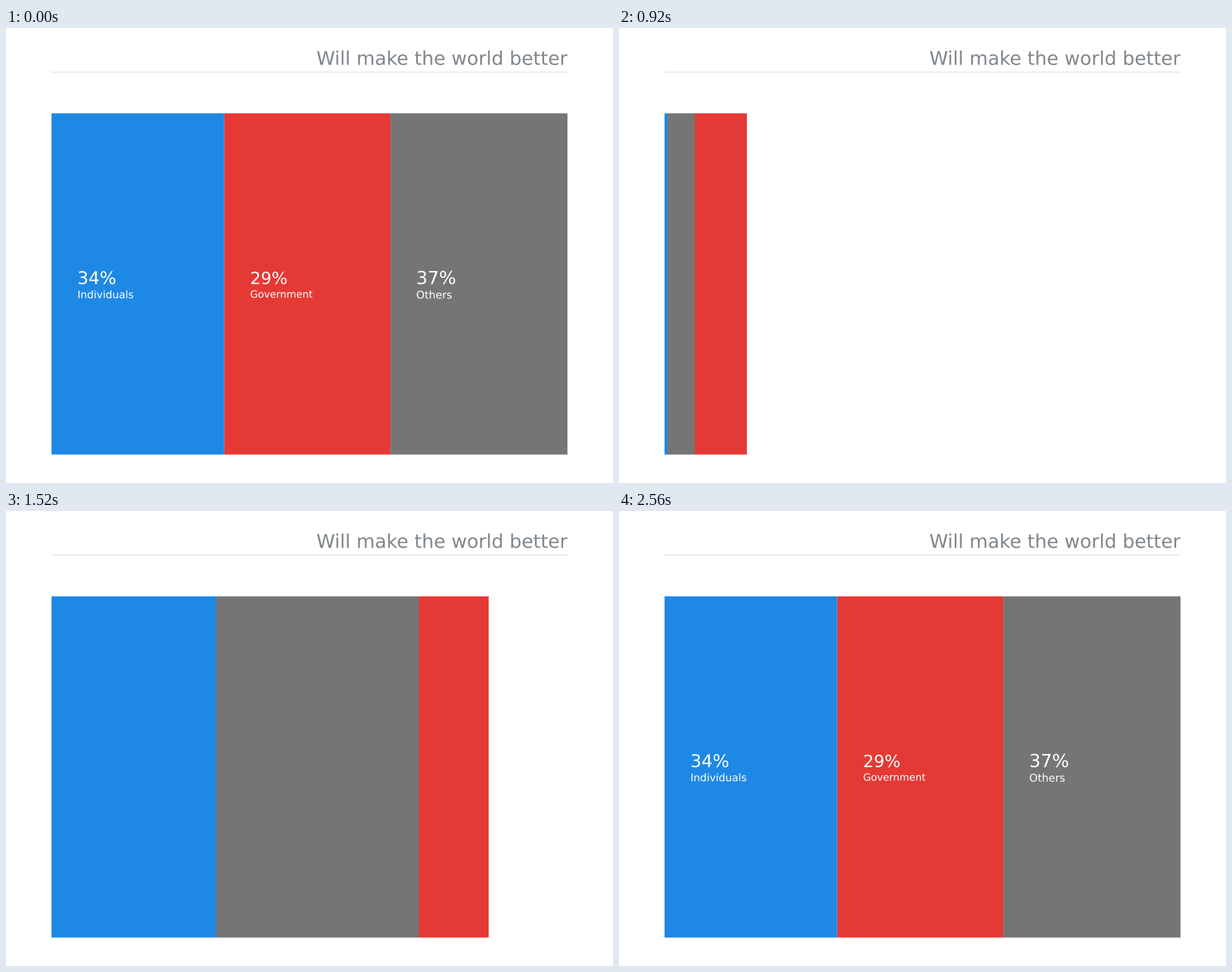
Write a matplotlib script that moves like this. It is 864 by 648 pixels and loops after 6600 ms.

```python
import matplotlib.pyplot as plt
import numpy as np
from matplotlib.animation import FuncAnimation
from matplotlib.patches import PathPatch, Rectangle
from matplotlib.textpath import TextPath
from matplotlib.transforms import Affine2D

W, H = 864, 648
STEP, LOOP = 20, 6600
LEFT, RIGHT, TOP, BOTTOM = 64.8, 799.2, 121.5, 607.5
SPLIT_1, SPLIT_2 = 310.7, 547.1
BLUE, RED, GRAY, INK = "#1e88e5", "#e53935", "#757575", "#80868b"

fig = plt.figure(figsize=(W / 100, H / 100), dpi=100, facecolor="white")
ax = fig.add_axes([0, 0, 1, 1])
ax.set_xlim(0, W)
ax.set_ylim(H, 0)
ax.axis("off")


def box(color, x, y, width, height):
    return ax.add_patch(Rectangle((x, y), width, height, fc=color, lw=0,
                                  snap=False))


def write(text, x, y, size, color, right=False):
    """Text with its baseline at y, starting (or ending) at x."""
    path = TextPath((0, 0), text, size=size, prop={"family": "DejaVu Sans"})
    if right:
        x -= path.get_extents().x1
    place = Affine2D().scale(1, -1).translate(x, y) + ax.transData
    patch = PathPatch(path, fc=color, lw=0, transform=place, zorder=9)
    return ax.add_patch(patch)


def sweep(t, start, end, stop):
    """Front moving from LEFT to stop with a cubic ease in and out."""
    p = np.clip((t - start) / (end - start), 0, 1)
    if p == 1:
        return stop
    eased = 4 * p ** 3 if p < 0.5 else 1 - 4 * (1 - p) ** 3
    x = LEFT + (stop - LEFT) * eased
    return max(LEFT, round(x)) if x > LEFT + 1 else x


write("Will make the world better", RIGHT, 52.5, 26.93, INK, right=True)
box("#dadce0", LEFT, 62.4, RIGHT - LEFT, 1)

# Strips side by side, left to right.
strips = [box(c, LEFT, TOP, 0, BOTTOM - TOP) for c in (BLUE, RED, GRAY, RED)]

# Label sizes follow the width of their column.
labels = []
middle = (TOP + BOTTOM) / 2 + 0.2
for x0, x1, share, name in ((LEFT, SPLIT_1, "34%", "Individuals"),
                            (SPLIT_1, SPLIT_2, "29%", "Government"),
                            (SPLIT_2, RIGHT, "37%", "Others")):
    x, width = x0 + 36.8, x1 - x0
    labels.append(write(share, x, middle, 0.1013 * width, "white"))
    labels.append(write(name, x, middle + 0.082 * width, 0.0604 * width,
                        "white"))


def draw(frame):
    t = frame * STEP
    if t < 60:
        t = LOOP
    front = sweep(t, 711, 2345, SPLIT_2)
    gray = sweep(t, 486, 2256, RIGHT)
    lead = sweep(t, 281, 2150, RIGHT)
    edges = [LEFT, min(front, SPLIT_1), front, gray, lead]
    for strip, x0, x1 in zip(strips, edges, edges[1:]):
        strip.set_x(x0)
        strip.set_width(x1 - x0)
    fade = float(np.clip((t - 2380) / 180, 0, 1))
    for label in labels:
        label.set_alpha(fade)
    return strips + labels


anim = FuncAnimation(fig, draw, frames=LOOP // STEP, interval=STEP,
                     repeat=True, repeat_delay=0, cache_frame_data=False)
plt.show()
```
